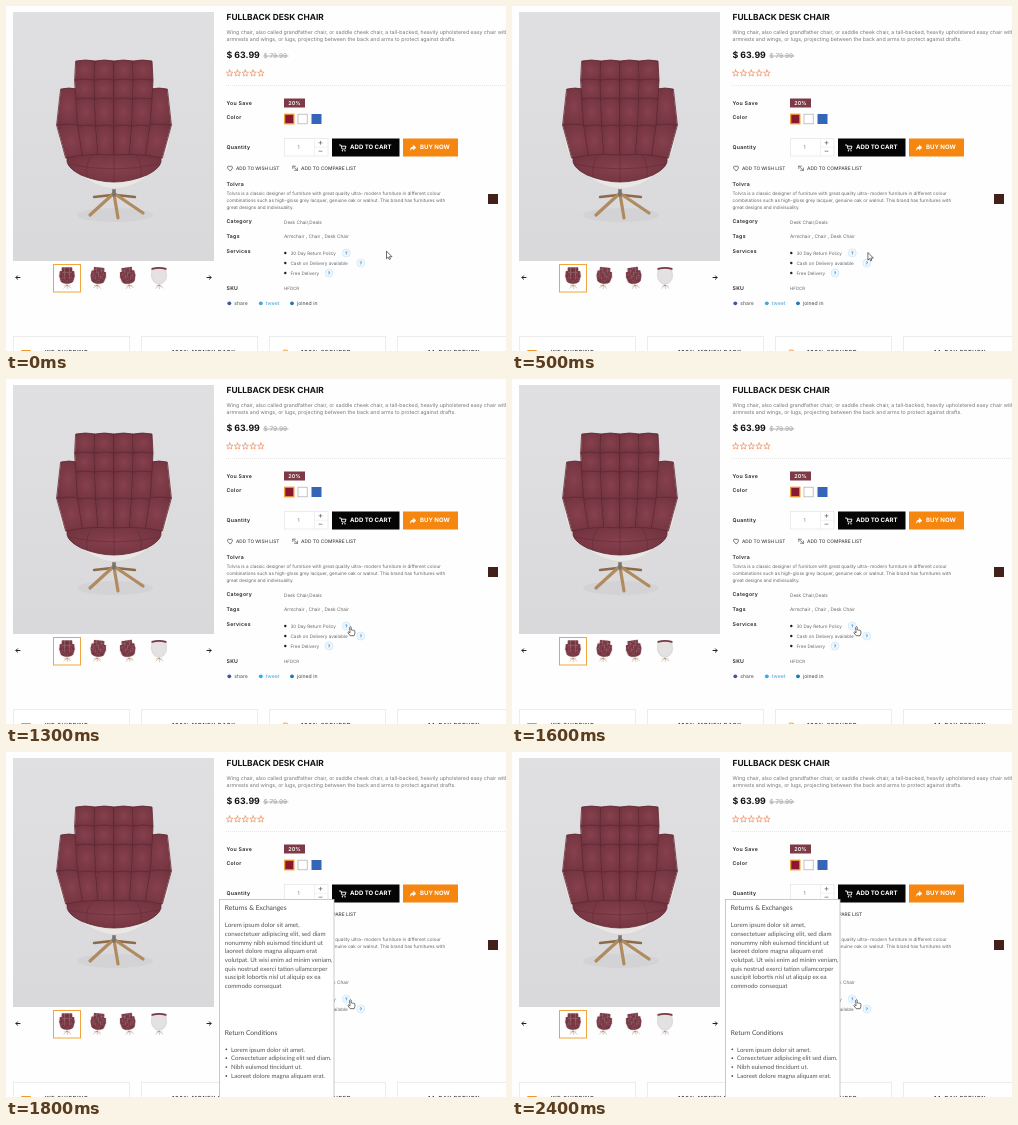
Animation, 500 px wide and 345 px high, one loop 2500 ms. Source, as an HTML page:

```html
<!DOCTYPE html>
<html lang="en">
<head>
<meta charset="utf-8">
<title>Desk chair product page</title>
<style>
  html, body { margin: 0; width: 100%; height: 100%; overflow: hidden; background: #fefefe; }
  svg { display: block; width: 500px; height: 345px; }
  text { font-family: Inter, "Open Sans", sans-serif; text-rendering: geometricPrecision; white-space: pre; }
  .pop text { font-family: Lato, "Open Sans", sans-serif; }
</style>
</head>
<body>
<svg id="stage" viewBox="0 0 500 345"></svg>
<script>
const LOOP = 2500, STEP = 100, GLIDE = 800, POPUP_AT = 1700;

// Text placed by the middle of its capitals.
const text = (x, middle, size, content, fill = '#666', weight = 400, extra = '') =>
  `<text x="${x}" y="${(middle + size * 0.36).toFixed(2)}" font-size="${size}" fill="${fill}" font-weight="${weight}" ${extra}>${content}</text>`;
const lines = (x, middle, pitch, size, list, fill) =>
  list.map((line, i) => text(x, middle + i * pitch, size, line, fill)).join('');
const rect = (x, y, w, h, fill, stroke = 'none', width = 1) =>
  `<rect x="${x}" y="${y}" width="${w}" height="${h}" fill="${fill}" stroke="${stroke}" stroke-width="${width}"/>`;
const path = (d, stroke, width = 1, fill = 'none') =>
  `<path d="${d}" fill="${fill}" stroke="${stroke}" stroke-width="${width}" stroke-linecap="round" stroke-linejoin="round"/>`;
const dot = (x, y, r, fill, stroke = 'none') =>
  `<circle cx="${x}" cy="${y}" r="${r}" fill="${fill}" stroke="${stroke}" stroke-width=".6"/>`;
const label = (y, content) => text(220.5, y, 5.2, content, '#222', 600, 'letter-spacing=".3"');

function star(x, y) {
  const points = Array.from({ length: 10 }, (_, i) => {
    const r = i % 2 ? 1.5 : 3.4, a = i * Math.PI / 5;
    return `${(x + r * Math.sin(a)).toFixed(2)} ${(y - r * Math.cos(a)).toFixed(2)}`;
  });
  return path(`M${points.join('L')}Z`, '#ee8a5c', 0.7);
}

// Padded cells between successive [left, right, y] edges.
function quilt(edges, columns) {
  let cells = '';
  for (let row = 0; row + 1 < edges.length; row++) {
    const at = ([left, right], k) => left + (right - left) * k / columns;
    const upper = edges[row], lower = edges[row + 1];
    for (let k = 0; k < columns; k++) {
      const a = at(upper, k), b = at(upper, k + 1), c = at(lower, k + 1), d = at(lower, k);
      cells += path(`M${a} ${upper[2]}Q${(a + b) / 2} ${upper[2] - 2} ${b} ${upper[2]}L${c} ${lower[2]}Q${(c + d) / 2} ${lower[2] - 1} ${d} ${lower[2]}Z`,
        '#5f2934', 0.8, 'url(#pad)');
    }
  }
  return cells;
}

function chairLegs() {
  return path('M106 189L88 191M110 189L129 191', '#8d6b48', 2.4) +
    path('M107 188L84 209M109 188L137 207M108 188L112 212', '#b08b60', 3.2) +
    path('M108 180V189', '#77726e', 3.5);
}

function chair() {
  const wing = quilt([[55, 71, 83], [51, 73, 119], [60, 80, 152]], 1);
  return chairLegs() +
    path('M52 118Q50 150 70 166Q90 182 108 183Q130 182 146 166Q166 150 164 118Z', '#d5d2d1', 0.6, '#e9e7e6') +
    wing + `<g transform="translate(216 0) scale(-1 1)">${wing}</g>` +
    quilt([[70, 146, 55], [69, 147, 74], [70, 146, 93], [72, 144, 120], [77, 139, 151]], 4) +
    path('M61 152Q80 147 108 149Q136 147 155 152Q157 161 141 169Q124 176 108 176Q92 176 75 169Q59 161 61 152Z', '#5f2934', 0.8, 'url(#pad)') +
    path('M108 149V175M86 149Q79 158 81 171M130 149Q137 158 135 171M62 158Q108 168 154 158', '#65303a', 0.7);
}

function gallery() {
  const thumb = (x, turn) =>
    `<use href="#chair" transform="translate(${x} 272) rotate(${turn}) scale(.135) translate(-108 -133)"/>`;
  const rearView = `<g transform="translate(153 272) scale(.135) translate(-108 -133)">${chairLegs()}` +
    path('M58 60H158L164 120Q158 172 108 180Q58 172 52 120Z', '#c9c6c6', 4, '#e3e1e1') +
    path('M58 66Q108 50 158 66', '#7b3743', 13) + '</g>';
  return rect(7, 6, 201, 249, 'url(#wall)') +
    '<ellipse cx="109" cy="209" rx="38" ry="7" fill="#cdcccf" opacity=".5"/><use href="#chair"/>' +
    rect(47.5, 258.5, 27, 27.5, '#fff', '#f2a53c') +
    thumb(61, 0) + thumb(92, 7) + thumb(122, -8) + rearView +
    path('M14 271.5H10M11.6 269.8L9.9 271.5L11.6 273.2', '#222', 1) +
    path('M201 271.5H205M203.4 269.8L205.1 271.5L203.4 273.2', '#222', 1);
}

function details() {
  return text(220.5, 10.8, 8.4, 'FULLBACK DESK CHAIR', '#111', 700) +
    lines(220.5, 26, 7.5, 5.25, [
      'Wing chair, also called grandfather chair, or saddle cheek chair, a tall-backed, heavily upholstered easy chair with',
      'armrests and wings, or lugs, projecting between the back and arms to protect against drafts.'], '#777') +
    text(220.5, 49, 8.8, '$ 63.99', '#111', 700) +
    text(257.5, 50, 6.5, '$ 79.99', '#aaa', 500) + path('M257.5 50H282', '#999', 0.7) +
    [0, 1, 2, 3, 4].map(i => star(223.7 + i * 7.8, 67.3)).join('') +
    '<path d="M220 79.5H500" stroke="#ddd" stroke-width=".7" stroke-dasharray="1 1"/>' +
    label(97, 'You Save') + rect(278, 92.5, 21, 9, '#7d3a46') + text(288.5, 97, 5.4, '20%', '#fff', 600, 'text-anchor="middle"') +
    label(111.5, 'Color') +
    rect(278.7, 108.2, 9.2, 9.6, '#8c1730', '#f0a030', 1.2) +
    rect(292, 108.2, 9.2, 9.6, '#fff', '#aaa', 0.7) +
    rect(305.5, 108, 10, 10, '#3565b8');
}

function purchase() {
  return label(141, 'Quantity') + rect(278.5, 132.5, 43.5, 17.5, '#fff', '#e4e4e4', 0.7) +
    path('M308.5 133V150M308.5 141.2H322', '#e8e8e8', 0.6) +
    text(291.5, 141, 5.2, '1', '#777') +
    path('M313 136.8H316M314.5 135.3V138.3M313 145.2H316', '#666', 0.7) +
    rect(326, 132.5, 67.5, 18, '#050505') + rect(397, 132.5, 55, 18, '#f5860f') +
    path('M333.5 139H335L336 143H339.2L340 140.2H335.4', '#fff', 0.9) + dot(336.4, 144.8, 0.7, '#fff') + dot(339, 144.8, 0.7, '#fff') +
    path('M404.3 144Q404.5 140.7 407.3 140.7V139L410 141.6L407.3 144V142.4Q405.4 142.2 404.3 144Z', '#fff', 0.4, '#fff') +
    text(344, 141.3, 6.05, 'ADD TO CART', '#fff', 700) + text(414, 141.3, 6.05, 'BUY NOW', '#fff', 700) +
    path('M224 164.8L221.7 162.3Q221 160.2 222.8 160Q223.7 160 224 160.9Q224.4 160 225.2 160Q227 160.2 226.3 162.3Z', '#444', 0.7) +
    text(230, 162, 4.75, 'ADD TO WISH LIST', '#444', 500) +
    path('M286.8 160.2H289.5M286.8 160.2V162.5M291.4 164.3H288.5M291.4 164.3V162M288 161.3L290.4 163.4', '#555', 0.7) +
    text(295, 162, 4.85, 'ADD TO COMPARE LIST', '#444', 500);
}

function facts() {
  const help = (x, y) => dot(x, y, 4, '#eef7fe', '#c5e2f7') + text(x, y, 4.8, '?', '#2f86d1', 600, 'text-anchor="middle"');
  const service = (y, content, x) => dot(279.3, y, 1.2, '#222') + text(284.5, y, 4.6, content) + help(x, y);
  const social = (x, content, icon, fill) => dot(x, 297.3, 1.9, icon) + text(x + 5, 297.3, 5.15, content, fill);
  return label(178, 'Tolvra') +
    lines(220.5, 187.2, 7, 4.62, [
      'Tolvra is a classic designer of furniture with great quality ultra- modern furniture in different colour',
      'combinations such as high-gloss grey lacquer, genuine oak or walnut. This brand has furnitures with',
      'great designs and indivisuality.']) +
    rect(482, 188, 10, 10, '#43211a') +
    label(215.5, 'Category') + text(278, 216, 4.7, 'Desk Chair,Deals') +
    label(230, 'Tags') + text(278, 230.3, 4.75, 'Armchair , Chair , Desk Chair') +
    label(245.5, 'Services') +
    service(247, '30 Day Return Policy', 340.3) +
    service(257, 'Cash on Delivery available', 354.8) +
    service(267, 'Free Delivery', 323) +
    label(282, 'SKU') + text(278, 282, 4.45, 'HFDCR') +
    social(223.3, 'share', '#3b5998', '#555') + social(254.8, 'tweet', '#36a9e8', '#4a9fd0') + social(286, 'joined in', '#1d78b5', '#444');
}

function cards() {
  const titles = ['WE SHIPPING', '100% MONEY BACK', '100% SECURED', '14-DAY RETURN'];
  const starts = [39, 166, 295, 422];
  return titles.map((title, i) =>
    rect(7.5 + i * 128, 330.5, 116, 40, '#fff', '#e8e8e8', 0.8) +
    text(starts[i], 345.8, 5.6, title, '#333', 600, 'letter-spacing=".6"')).join('') +
    path('M15.5 349V344.5H24.5V349', '#f0962e', 1) + path('M275.5 349Q275.5 344 279.3 344Q283 344 283 349', '#f0962e', 1);
}

function popup() {
  const items = ['Lorem ipsum dolor sit amet.', 'Consectetuer adipiscing elit sed diam.', 'Nibh euismod tincidunt ut.', 'Laoreet dolore magna aliquam erat.'];
  return rect(213.5, 147.5, 114.5, 210, '#fff', '#bcbcbc', 0.8) +
    text(218.8, 155.5, 6.7, 'Returns &amp; Exchanges', '#444') +
    lines(218.8, 173, 8.67, 6.2, [
      'Lorem ipsum dolor sit amet,', 'consectetuer adipiscing elit, sed diam', 'nonummy nibh euismod tincidunt ut',
      'laoreet dolore magna aliquam erat', 'volutpat. Ut wisi enim ad minim veniam,', 'quis nostrud exerci tation ullamcorper',
      'suscipit lobortis nisl ut aliquip ex ea', 'commodo consequat'], '#555') +
    text(218.8, 280.3, 6.6, 'Return Conditions', '#444') +
    items.map((item, i) => dot(220.3, 297.3 + i * 8.9, 0.9, '#555')).join('') +
    lines(225, 297.3, 8.9, 6.1, items, '#555');
}

const pointers =
  `<g id="arrow">${path('M0 0V7.2L1.7 5.7L2.8 8L4 7.4L2.9 5.2H5.1Z', '#333', 0.7, '#fff')}</g>` +
  `<g id="hand">${path('M-.7 .7Q0-.4 .7 .7V3.5Q1.5 2.8 2 3.7Q2.8 3.2 3.3 4Q4.4 3.7 4.4 5V7L3.6 9.2H-.3L-2.7 6Q-2.7 4.8-.7 6Z', '#333', 0.7, '#fff')}</g>`;

document.getElementById('stage').innerHTML =
  `<defs>
    <radialGradient id="pad" r=".75"><stop offset="0" stop-color="#86414d"/><stop offset="1" stop-color="#6d303c"/></radialGradient>
    <linearGradient id="wall" x2="0" y2="1"><stop offset="0" stop-color="#e0dfe1"/><stop offset="1" stop-color="#d9d8da"/></linearGradient>
    <g id="chair">${chair()}</g>
  </defs>` +
  rect(0, 0, 500, 345, '#fefefe') + gallery() + details() + purchase() + facts() + cards() +
  `<g id="popup" class="pop">${popup()}</g>` + pointers;

const [arrow, hand, pop] = ['arrow', 'hand', 'popup'].map(id => document.getElementById(id));
const show = (node, visible) => node.setAttribute('visibility', visible ? 'visible' : 'hidden');

function update(now) {
  const t = Math.floor((now % LOOP) / STEP) * STEP;
  const p = Math.min(t / GLIDE, 1), eased = p * p * (3 - 2 * p);
  const place = `translate(${380.5 - 36 * eased} ${245.5 + 2 * eased})`;
  const hovering = t >= GLIDE - STEP;
  arrow.setAttribute('transform', place);
  hand.setAttribute('transform', place);
  show(arrow, !hovering);
  show(hand, hovering);
  show(pop, t >= POPUP_AT);
}

const start = performance.now();
function tick() {
  update(performance.now() - start);
  requestAnimationFrame(tick);
}
tick();
</script>
</body>
</html>
```
